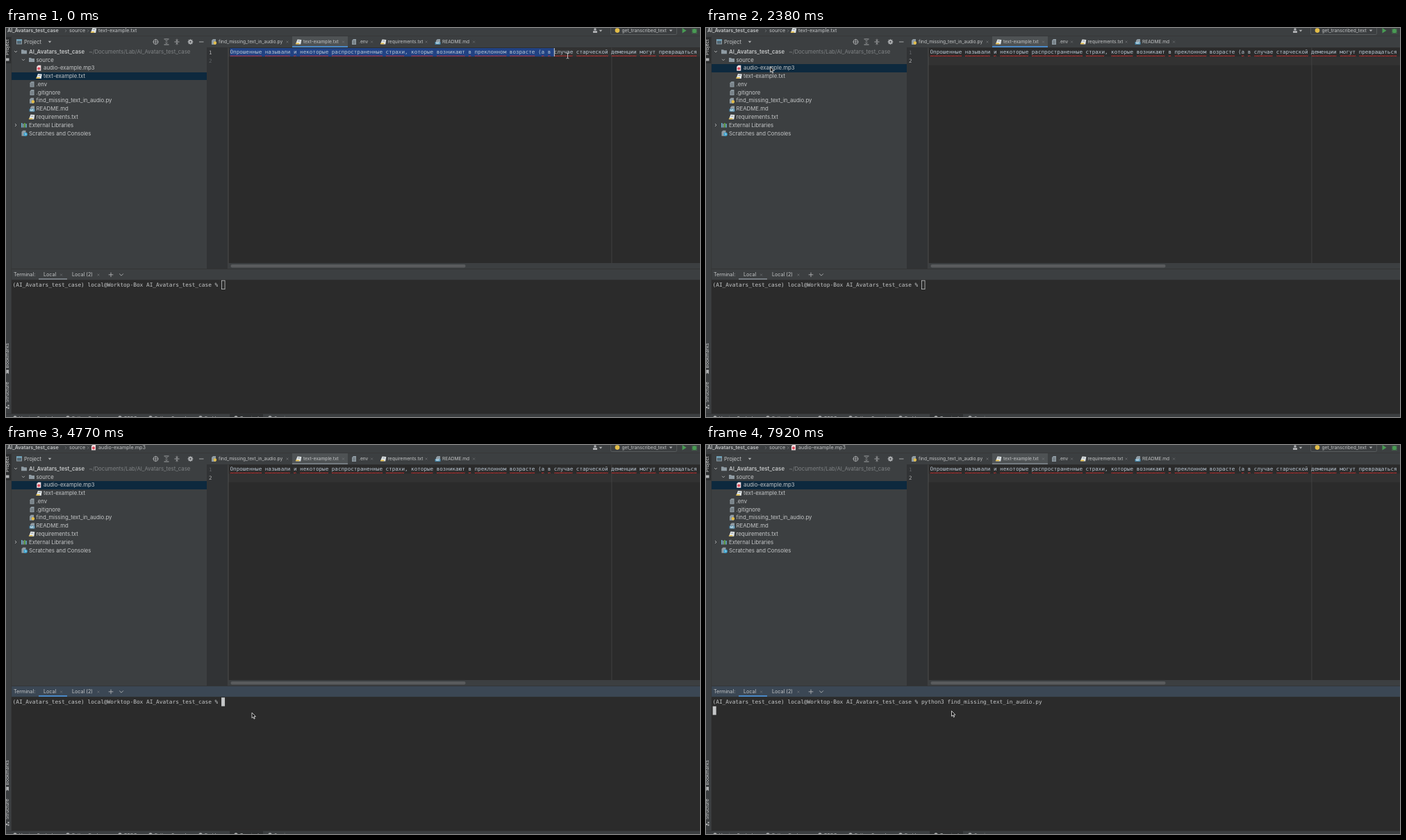
An HTML page with a canvas for the animation above (8000 ms loop, 999 px wide and 561 px high).

```html
<!DOCTYPE html>
<html lang="en">
<head>
<meta charset="utf-8">
<title>Editor and terminal</title>
<style>
html, body { margin: 0; width: 100%; height: 100%; overflow: hidden; background: #2b2b2b; }
canvas { display: block; width: 999px; height: 561px; }
</style>
</head>
<body>
<canvas></canvas>
<script>
const W = 999, H = 561, LOOP = 8000;
const canvas = document.querySelector('canvas');
const c = canvas.getContext('2d');
const ratio = window.devicePixelRatio || 1;
canvas.width = W * ratio;
canvas.height = H * ratio;

const UI = 'Inter, sans-serif', MONO = '"DejaVu Sans Mono", monospace';
const PANEL = '#3c3f41', EDITOR = '#2b2b2b', FOCUS = '#3b4754', TEXT = '#c4c6c7';
const ICON = '#afb1b3', BLUE = '#4a88c7', GREY = '#747a80', YELLOW = '#e3bd48', SKY = '#6fb3d2';

const PROJECT = 'AI_Avatars_test_case';
const PROMPT = `(${PROJECT}) local@Worktop-Box ${PROJECT} % `;
const SCRIPT = 'find_missing_text_in_audio.py';
const LINE = 'Опрошенные называли и некоторые распространенные страхи, которые возникают в преклонном ' +
  'возрасте (а в случае старческой деменции могут превращаться';
const EDIT_X = 322.5, EDIT_SIZE = 7.6, TERM_X = 9.5, TERM_SIZE = 7.8;
const ADVANCE = 0.60205;

// Held values: [start time, value...]
const MOUSE = [
  [0, 808.5, 40], [140, 836, 40], [290, 876, 40], [440, 917, 40], [590, 950, 40], [740, 968, 40],
  [1190, 905, 46], [1340, 720, 65], [1480, 640.5, 72], [1630, 610, 74], [1780, 470, 73],
  [1930, 270, 68], [2080, 125, 60], [2230, 92.5, 56],
  [3280, 92, 60], [3430, 95, 69], [3580, 106, 82], [3730, 129, 95], [3880, 147, 103.5],
  [4030, 205, 180], [4180, 275, 300], [4320, 329, 402], [4470, 342, 401], [4620, 350, 394],
  [4770, 354, 386], [4920, 354.5, 382], [7770, 354, 383], [7920, 353.5, 383.5]
];
const SELECTION = [[0, 102], [140, 109], [290, 118], [440, 127], [590, 134], [740, 141], [1480, 0]];
const COMMAND = [[0, ''], [5520, 'python3'], [6570, 'python3 f'], [6720, 'python3 ' + SCRIPT]];
const at = (track, t) => track.findLast(key => key[0] <= t).slice(1);
const within = (t, from, to) => t >= from && t < to;

function rect(x, y, w, h, color) {
  c.fillStyle = color;
  c.fillRect(x, y, w, h);
}
function dot(x, y, r, color) {
  c.fillStyle = color;
  c.beginPath();
  c.arc(x, y, r, 0, Math.PI * 2);
  c.fill();
}
function path(points, color, width = 0.9, fill = false) {
  c.beginPath();
  points.forEach(([x, y]) => c.lineTo(x, y));
  if (fill) { c.closePath(); c.fillStyle = color; c.fill(); return; }
  c.strokeStyle = color;
  c.lineWidth = width;
  c.stroke();
}
// Text placed by its left edge and the middle of its line.
function label(s, x, y, { size = 7.8, color = TEXT, weight = 400, font = UI } = {}) {
  c.font = `${weight} ${size}px ${font}`;
  c.fillStyle = color;
  c.fillText(s, x, y + size * 0.35);
}
function sideLabel(s, x, y, color = TEXT) {
  c.save();
  c.translate(x, y);
  c.rotate(-Math.PI / 2);
  label(s, 0, 0, { size: 6.8, color });
  c.restore();
}
function chevron(x, y, right, size = 2, color = ICON) {
  const h = size / 2;
  path(right ? [[x - h, y - size], [x + h, y], [x - h, y + size]]
             : [[x - size, y - h], [x, y + h], [x + size, y - h]], color);
}
const triangle = (x, y) => path([[x - 2.3, y - 1.2], [x + 2.3, y - 1.2], [x, y + 1.5]], ICON, 0, true);
function cross(x, y) {
  path([[x - 1.5, y - 1.5], [x + 1.5, y + 1.5]], '#777a7c', 0.6);
  path([[x + 1.5, y - 1.5], [x - 1.5, y + 1.5]], '#777a7c', 0.6);
}
function sheet(x, y, color) {
  path([[x - 1, y - 4], [x + 3, y - 4], [x + 3, y + 4], [x - 3, y + 4], [x - 3, y - 2]], color, 0, true);
}

const icons = {
  folder(x, y) {
    path([[x - 4, y - 3], [x - 1, y - 3], [x, y - 2], [x + 4, y - 2], [x + 4, y + 3], [x - 4, y + 3]], '#8f9ba3', 0, true);
  },
  audio(x, y) {
    sheet(x, y, '#f3dfe1');
    dot(x, y + 0.8, 2, '#df4a5b');
  },
  text(x, y) {
    path([[x - 1.5, y - 3.5], [x + 4.3, y - 3], [x + 3.2, y + 3.5], [x - 4, y + 3.2]], '#e4e8ea', 0, true);
    path([[x - 4.3, y + 3.3], [x - 3.6, y + 1.6], [x + 1.5, y + 1.6], [x + 1, y + 3.3]], YELLOW, 0, true);
    path([[x - 1, y - 1.2], [x + 2.5, y - 1.2]], '#68777f', 0.8);
  },
  plain(x, y) {
    sheet(x, y, '#8f9ba3');
    for (const d of [-1.3, 0.5, 2.3]) path([[x - 1.8, y + d], [x + 1.8, y + d]], '#4a4f52', 0.6);
  },
  script(x, y) {
    sheet(x - 0.5, y, '#8f9ba3');
    dot(x + 1.4, y + 1.5, 2.2, YELLOW);
  },
  markdown(x, y) {
    sheet(x + 0.5, y, '#8f9ba3');
    rect(x - 4, y, 8, 4, '#3d7fa3');
    label('MD', x - 3.1, y + 2, { size: 3.9, color: '#e3eef3', weight: 700 });
  },
  library(x, y) {
    [SKY, '#8f9ba3', '#62b543', SKY].forEach((color, i) => rect(x - 4 + i * 2.1, y - 3 + (i % 2), 1.5, 6.5 - (i % 2), color));
  },
  scratch(x, y) {
    sheet(x - 1, y, '#8f9ba3');
    dot(x + 1.6, y + 1.5, 2.7, '#40a5d0');
    path([[x + 1.6, y], [x + 1.6, y + 1.7], [x + 2.8, y + 1.7]], '#ffffff', 0.6);
  }
};

const TREE = [
  ['folder', 26, 33, PROJECT], ['folder', 37, 43.5, 'source'],
  ['audio', 47.3, 54, 'audio-example.mp3'], ['text', 47.5, 54, 'text-example.txt'],
  ['plain', 37.5, 43.5, '.env'], ['plain', 37.5, 43.5, '.gitignore'],
  ['script', 37.5, 43.5, SCRIPT], ['markdown', 37.5, 43.5, 'README.md'],
  ['text', 37, 43.5, 'requirements.txt'],
  ['library', 26, 33, 'External Libraries'], ['scratch', 26.5, 33, 'Scratches and Consoles']
];
const TABS = [
  ['script', 299.5, 306, SCRIPT, 405], ['text', 421, 428, 'text-example.txt', 485.5],
  ['plain', 501, 508, '.env', 526.5], ['text', 543, 549.5, 'requirements.txt', 605],
  ['markdown', 621.5, 628, 'README.md', 673.5]
];

function topBar(audioOpen) {
  rect(0, 0, W, 11.5, PANEL);
  label(PROJECT, 2, 3.6, { size: 7.2, weight: 600 });
  chevron(86, 4, true, 1.8, '#6e7173');
  label('source', 91, 3.6, { size: 7.2 });
  chevron(118, 4, true, 1.8, '#6e7173');
  icons[audioOpen ? 'audio' : 'text'](126, 3.5);
  label(audioOpen ? 'audio-example.mp3' : 'text-example.txt', 133, 3.6, { size: 7.2 });

  dot(848, 2, 1.8, ICON);
  rect(845, 4.2, 6, 2.8, ICON);
  triangle(856, 4);
  c.strokeStyle = '#5e6163';
  c.lineWidth = 0.8;
  c.beginPath();
  c.roundRect(870.5, -5, 95, 14.5, 2);
  c.stroke();
  dot(880, 3.6, 3.3, YELLOW);
  label('get_transcribed_text', 886.5, 3.6, { size: 6.7 });
  triangle(957, 3.8);
  path([[973.5, 0], [979.5, 3.8], [973.5, 7.6]], '#499c54', 0, true);
  dot(991, 4.2, 2.9, '#499c54');
  for (const d of [-2, 0.5, 3]) path([[987, 4 + d], [995, 4 + d]], '#499c54', 0.8);
}

function projectPanel(t, focused) {
  rect(8, 12, 281, 336, PANEL);
  if (focused) rect(8, 12.5, 281, 15.5, FOCUS);
  rect(15, 16.5, 8, 7, '#8f9ba3');
  rect(16, 18.5, 6, 4, '#4d6673');
  rect(15, 16.5, 8, 1.5, SKY);
  label('Project', 26, 20, { size: 7.5 });
  triangle(63, 20);

  c.strokeStyle = ICON;
  c.lineWidth = 0.9;
  c.beginPath();
  c.arc(215.5, 20, 3.4, 0, Math.PI * 2);
  c.stroke();
  path([[215.5, 15.8], [215.5, 24.2]], ICON, 0.7);
  path([[211.3, 20], [219.7, 20]], ICON, 0.7);
  path([[227.5, 16], [234.5, 16]], ICON);
  path([[227.5, 24], [234.5, 24]], ICON);
  chevron(231, 18.5, false, 1.5);
  chevron(231, 21.6, false, 1.5);
  path([[242.5, 20], [249.5, 20]], ICON);
  chevron(246, 17.6, false, 1.5);
  path([[244.5, 23.3], [246, 21.8], [247.5, 23.3]], ICON);
  path([[246, 15.5], [246, 24.5]], ICON, 0.6);
  for (let i = 0; i < 4; i++) {
    const a = i * Math.PI / 4, x = Math.cos(a) * 3.8, y = Math.sin(a) * 3.8;
    path([[265.5 - x, 20 - y], [265.5 + x, 20 + y]], ICON, 1.5);
  }
  dot(265.5, 20, 2.8, ICON);
  dot(265.5, 20, 1.1, PANEL);
  path([[278, 20], [284.5, 20]], ICON);

  const selected = t < 2380 ? 3 : 2;
  TREE.forEach(([icon, iconX, x, name], i) => {
    const y = 34.2 + i * 11.76;
    const top = Math.round(y - 5.9), bottom = Math.round(y + 5.9);
    if (i === selected) rect(8, top, 281, bottom - top, focused ? '#2f65ca' : '#0d293e');
    icons[icon](iconX, y);
    const active = focused && i === selected;
    label(name, x, y, { weight: i === 0 ? 600 : active ? 500 : 400, color: active ? '#ffffff' : TEXT });
  });
  label(`~/Documents/Lab/${PROJECT}`, 119.5, 34.2, { color: '#7f8284' });
  chevron(14, 34, false);
  chevron(25, 45.8, false);
  chevron(14, 140, true);
}

function editor(t, focused) {
  rect(289, 12, W - 289, 16, PANEL);
  rect(412, 12, 80, 16, '#4e5254');
  rect(412, 26, 80, 2, focused ? BLUE : GREY);
  TABS.forEach(([icon, iconX, x, name, closeX]) => {
    icons[icon](iconX, 20);
    label(name, x, 20, { size: 6.6 });
    cross(closeX, 20);
  });
  rect(289, 28, W - 289, 0.6, '#323232');

  const row = t < 1480 ? 0 : 1;
  rect(289, 28.5, 31, 319.5, '#313335');
  rect(320, 28.5, W - 320, 319.5, EDITOR);
  rect(320, 29 + row * 12.3, W - 320, 12.3, '#323232');
  rect(319.6, 28.5, 0.8, 319.5, '#555555');
  rect(871.5, 28.5, 0.8, 319.5, '#474747');
  for (const i of [0, 1]) {
    label(i + 1, 292, 35.2 + i * 12.5, { size: 7.4, font: MONO, color: i === row ? '#b0b0b0' : '#606366' });
  }

  const cell = EDIT_SIZE * ADVANCE;
  const [selection] = at(SELECTION, t);
  if (selection) rect(EDIT_X, 29, selection * cell, 12.2, '#214283');
  for (const word of LINE.matchAll(/[а-яА-Я]+/g)) {
    const wave = [];
    for (let d = 0; d <= word[0].length * cell; d += 1.2) {
      wave.push([EDIT_X + word.index * cell + d, 39.9 + (wave.length % 2) * 0.8]);
    }
    path(wave, '#dc2f2f', 0.9);
  }
  label(LINE, EDIT_X, 34.8, { size: EDIT_SIZE, font: MONO, color: '#bac6d2' });
  if (selection) rect(EDIT_X + selection * cell - 0.4, 29, 1, 12, '#d0d0d0');
  else if (t < 1930) rect(EDIT_X, 41.8, 1, 11.5, '#d0d0d0');

  rect(320, 339, W - 320, 9, PANEL);
  c.fillStyle = '#595b5d';
  c.beginPath();
  c.roundRect(323.5, 341, 338, 4.5, 2);
  c.fill();
}

function terminal(t, focused) {
  rect(8, 347.5, W - 8, 15.8, focused ? FOCUS : PANEL);
  rect(8, 347.3, W - 8, 0.7, '#323232');
  label('Terminal:', 11, 355.8, { size: 7.2 });
  label('Local', 54, 355.8, { size: 7.2 });
  cross(79.5, 356);
  label('Local (2)', 95, 355.8, { size: 7.2 });
  cross(133, 356);
  rect(47, 361, 41, 2, focused ? BLUE : GREY);
  path([[147.7, 355.8], [154.3, 355.8]], ICON);
  path([[151, 352.5], [151, 359.1]], ICON);
  chevron(166, 355.8, false, 2.8);
  rect(8, 363.3, W - 8, 193, EDITOR);

  const [command] = at(COMMAND, t);
  const line = PROMPT + command;
  label(line, TERM_X, 370.3, { size: TERM_SIZE, font: MONO });
  const sent = t >= 7620;
  const x = TERM_X + (sent ? 0.2 : line.length * TERM_SIZE * ADVANCE);
  const y = sent ? 376.8 : 364.2;
  if (!focused) {
    c.strokeStyle = TEXT;
    c.lineWidth = 0.8;
    c.strokeRect(x + 0.4, y, 4.6, 12.4);
  } else if (!within(t, 6120, 6570) && !within(t, 7320, 7620)) {
    rect(x, y, 5, 12.5, TEXT);
  }
}

function frameBars() {
  rect(0, 11.5, 8, 545, PANEL);
  rect(0, 13, 7.5, 38, '#2d2f30');
  rect(7.5, 12, 0.6, 544, '#323232');
  sideLabel('Project', 2, 39, '#e0e0e0');
  rect(0, 43.5, 4.5, 4, ICON);
  sideLabel('Bookmarks', 1.5, 490.5);
  path([[0.3, 493], [4, 493], [4, 499], [2.1, 497.3], [0.3, 499]], ICON, 0, true);
  sideLabel('Structure', 1.5, 540);
  rect(0, 546, 2, 2.2, ICON);
  rect(2.5, 543.5, 2, 2.2, ICON);
  rect(2.5, 547, 2, 2.2, ICON);

  rect(0, 556.3, W, 5, PANEL);
  rect(0, 556, W, 0.6, '#323232');
  rect(322, 556.5, 48, 5, '#2d2f30');
  [[19, 'Version Control'], [95, 'Python Packages'], [170, 'TODO'], [214, 'Python Console'],
   [286, 'Problems'], [337, 'Terminal'], [386, 'Services']].forEach(([x, name]) => {
    label(name, x, 562.5, { size: 6.6 });
    dot(x - 6, 562, 2.7, ICON);
  });
}

function pointer(t) {
  const [x, y] = at(MOUSE, t);
  if (x > 320 && y < 347) {
    path([[x, y - 3.6], [x, y + 3.6]], '#e0e0e0', 0.8);
    for (const end of [-1, 1]) {
      path([[x - 1.9, y + end * 4.1], [x, y + end * 3.5], [x + 1.9, y + end * 4.1]], '#e0e0e0', 0.7);
    }
    return;
  }
  const arrow = [[0, 0], [0, 7.7], [1.8, 6.1], [3, 9], [4.2, 8.5], [3, 5.7], [5.4, 5.6], [0, 0]]
    .map(([dx, dy]) => [x + dx, y + dy]);
  path(arrow, '#111111', 0, true);
  path(arrow, '#f0f0f0', 0.8);
}

const start = performance.now();
function draw() {
  const t = (performance.now() - start) % LOOP;
  const editing = t < 2530, inTerminal = t >= 4620;
  c.setTransform(ratio, 0, 0, ratio, 0, 0);
  rect(0, 0, W, H, '#323232');
  topBar(!editing);
  projectPanel(t, !editing && !inTerminal);
  editor(t, editing);
  terminal(t, inTerminal);
  frameBars();
  pointer(t);
  requestAnimationFrame(draw);
}
draw();
</script>
</body>
</html>
```
